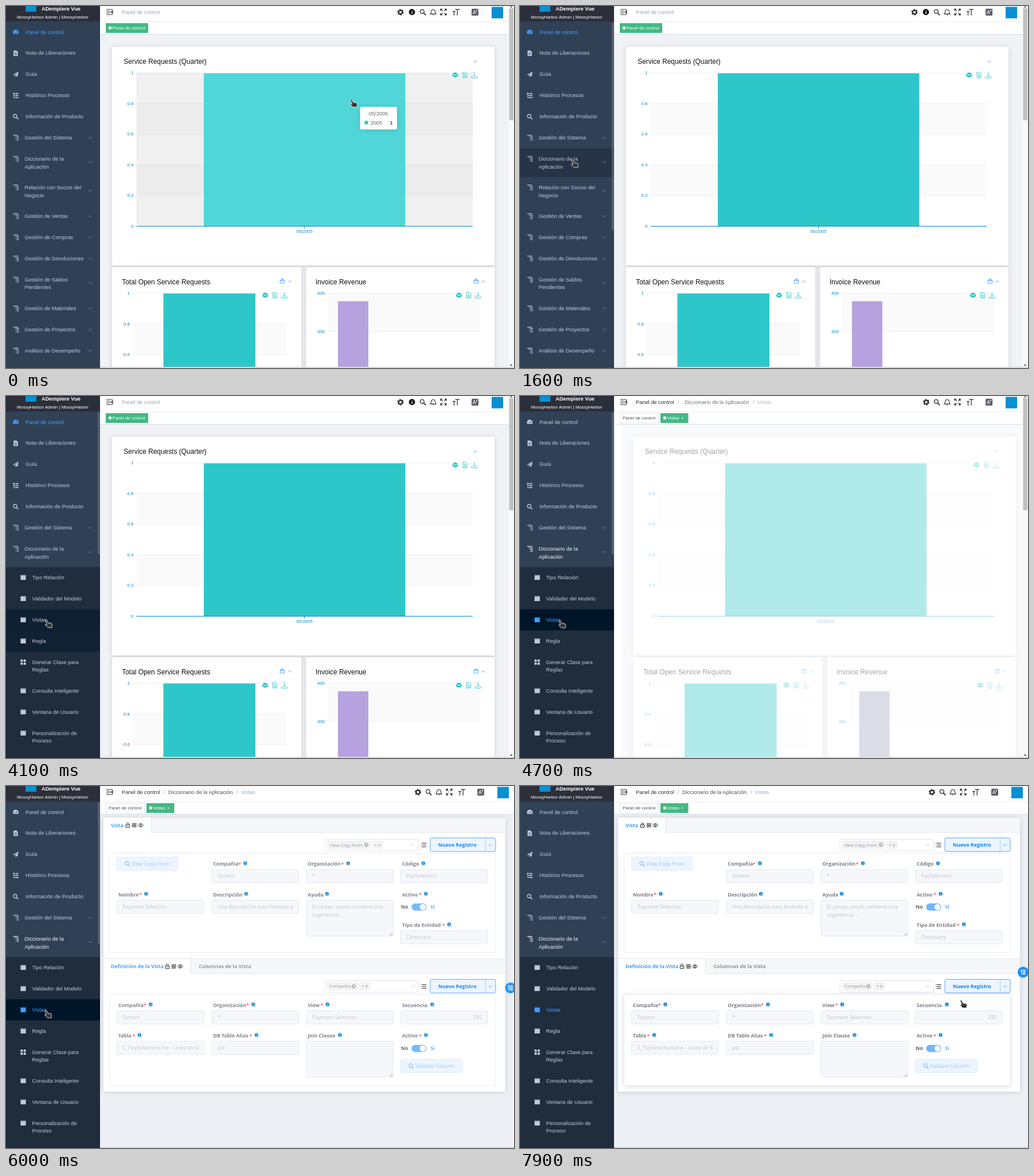
An HTML page for the animation above (8 s loop, 886 by 632 pixels).

```html
<!DOCTYPE html>
<html lang="es">
<head>
<meta charset="utf-8">
<title>Panel de control</title>
<style>
html, body { margin: 0; width: 100%; height: 100%; overflow: hidden; background: #fff; }
svg { display: block; }
#stage { width: 886px; height: 632px; font-family: "Liberation Sans", Arial, sans-serif; }
#form { font-family: "Open Sans", "Noto Sans", sans-serif; }
.card { filter: drop-shadow(0 1px 4px rgba(0,0,0,.14)); }
</style>
</head>
<body>
<svg id="stage" viewBox="0 0 886 632"></svg>
<script>
const LOOP = 8000, BLUE = '#409eff', TEAL = '#2ec7c9', MENU = '#bfcbd9', AXIS = '#008acd';

// ---- drawing helpers -------------------------------------------------
const rect = (x, y, w, h, fill, more = '') => `<rect x="${x}" y="${y}" width="${w}" height="${h}" fill="${fill}" ${more}/>`;
const text = (x, y, s, fill, size = 9.24, more = '') =>
  `<text x="${x}" y="${y}" fill="${fill}" font-size="${size}" ${more}>${s}</text>`;
const line = (d, color, w = 1, more = '') => `<path d="${d}" fill="none" stroke="${color}" stroke-width="${w}" ${more}/>`;
const group = (id, body, more = '') => `<g id="${id}" ${more}>${body}</g>`;
const bold = 'font-weight="700"', mid = 'text-anchor="middle"', end = 'text-anchor="end"';
const chevron = (x, y, color, up) => line(`M${x - 3} ${y + (up ? 1.6 : -1.6)}l3 ${up ? -3.2 : 3.2} 3 ${up ? 3.2 : -3.2}`, color, .9);

const ICONS = {
  gauge: '<path d="M-4.2 3.4a4.9 4.9 0 1 1 8.4 0z"/><path d="M0 2L1.6-1.8M-3 .5h1M2 .5h1" stroke="#304156"/>',
  doc: '<path d="M-3.8-4.6h5l2.6 2.6v6.8h-7.6z"/><path d="M-2-.2h4M-2 2.2h4" stroke="#304156"/>',
  plane: '<path d="M4.8-4.7L-4.8.6l2.6 1.2L3-2.7-1 2.4v2.4L.8 3l2.4 1z"/>',
  tree: '<path d="M-4.8-4.5h3v2.2h-3zM-.6-4.4h5.2v1.9H-.6zM-.6-.9h5.2V1H-.6zM-.6 2.6h5.2v1.9H-.6zM-3.8-2.3h1v2h2v1h-2v2.5h2v1h-3z"/>',
  search: '<circle cx="-1" cy="-1" r="3" fill="none" stroke="currentColor" stroke-width="1.3"/><path d="M1.3 1.3L4.5 4.5" stroke="currentColor" stroke-width="1.7"/>',
  nested: '<path d="M-4.8-4.2H3.6M-2-1.5H-.8M.3-1.5h4.5M-.4 1.2H.6M1.4 1.2h3.4M-.4 4H.6M1.4 4h3.4" stroke="currentColor" stroke-width="1.3"/>',
  win: '<path d="M-4.6-4.2h1.4v1.2h1V-4.2h1.6v1.2h1V-4.2h1.6v1.2h1V-4.2h1.6v8.6h-9.2z"/>',
  blocks: '<path d="M-4.7-4.4h4v4h-4zM-4.7.7h4v4h-4zM.7.7h4v4h-4z"/><circle cx="2.7" cy="-2.4" r="2.2"/>',
  gear: '<circle r="3.3" fill="none" stroke="currentColor" stroke-width="2.3"/><circle r="4.8" fill="none" stroke="currentColor" stroke-width="1.6" stroke-dasharray="2.5 2.53"/>',
  info: '<circle r="5.4"/><path d="M.6-1L-.4 3.2M.9-3.2v1" stroke="#fff" stroke-width="1.4"/>',
  bell: '<path d="M-5 3.4h10C3.4 2 3.6.5 3.4-1.200 3-4.900-3-4.900-3.400-1.200-3.600.5-3.400 2-5 3.400zM-1 5h2M0-5v1" fill="none" stroke="currentColor" stroke-width="1.1"/>',
  full: '<path d="M-5-2v-3h3M2-5h3v3M5 2v3H2M-2 5h-3V2M-4.600-4.600l3.200 3.200M4.600-4.600L1.400-1.400M-4.600 4.600l3.200-3.200M4.600 4.600L1.400 1.400" fill="none" stroke="currentColor" stroke-width="1.300"/>',
  size: '<path d="M-1.500-4.500h7.500M2.200-4.500V6M-6-1h5M-3.500-1V6" stroke="currentColor" stroke-width="1.400"/>',
  lang: '<rect x="-6" y="-6" width="12" height="12" rx="1.500"/><path d="M-3.800 3.400L-1.200-3.400 1.400 3.400M-2.800 1.200H.4M2-3.500h2.600M3.300-3.500L2-.5" fill="none" stroke="#fff" stroke-width=".9"/>',
  stack: '<path d="M0-4.800L5-2.400 0 0-5-2.400z"/><path d="M-5-1.500v3.400L0 4.500 5 1.900v-3.400L0 1z"/>',
  page: '<path d="M-3.500-4.800h5l2 2v7.600h-7zM-1.800-1h3.600M-1.800 1h3.600M-1.800 3h3.600" fill="none" stroke="currentColor" stroke-width=".9"/>',
  down: '<path d="M0-5.500V2.500M-2.600 0L0 2.600 2.600 0M-4.800 2v3h9.600V2" fill="none" stroke="currentColor" stroke-width=".9"/>',
  box: '<path d="M-3.800-1h7.600v4.300h-7.600zM-2.800-1v-1.700h5.600V-1M-1.500-4.200h3" fill="none" stroke="currentColor" stroke-width=".9"/>',
  rows: '<path d="M-3-3.200h7.400M-3 0h7.400M-3 3.200h7.400M-4.800-3.200h1M-4.800 0h1M-4.800 3.200h1" stroke="currentColor" stroke-width="1.200"/>',
  lock: '<path d="M-3.200-.8h6.400v4.600h-6.400zM-2-.8v-1.400a2 2 0 0 1 4 0v1.400M0 1v1.200" fill="none" stroke="currentColor"/>',
  bars: '<path d="M-4-2.600h8M-4 0h8M-4 2.600h8" stroke="currentColor" stroke-width="1.300"/>',
  eye: '<path d="M-4.600 0Q0-6 4.600 0 0 6-4.600 0z" fill="none" stroke="currentColor"/><circle r="1.500" fill="none" stroke="currentColor"/>',
  tip: '<circle r="3.300"/><path d="M.3-.3L-.2 2M.5-1.800v.6" stroke="#fff" stroke-width=".9"/>'
};
const icon = (name, x, y, color, k = 1) =>
  `<g transform="translate(${x} ${y}) scale(${k})" color="${color}" fill="${color}">${ICONS[name]}</g>`;

// ---- sidebar ---------------------------------------------------------
const ROW = 36.96, TALL = 50;
function menuRows(labels, top, draw) {
  return labels.map(s => {
    const parts = s.split('|'), h = parts.length > 1 ? TALL : ROW, y = top;
    top += h;
    return draw(parts, y, h);
  }).join('');
}
const lines = (parts, x, y) => parts.map((s, i) => text(x, y + 21.7 + i * 13.2, s, 'currentColor')).join('');
const leafIcons = ['gauge', 'doc', 'plane', 'tree', 'search'];
let leaf = 0, sub = 0;
const leaves = menuRows(['Panel de control', 'Nota de Liberaciones', 'Guía', 'Histórico Procesos', 'Información de Producto'], 26.8,
  (p, y) => group('leaf' + leaf, icon(leafIcons[leaf++], 17, y + 18.6, 'currentColor') + lines(p, 34, y), `color="${MENU}"`));
const folder = (p, y, h) => icon('nested', 17.5, y + 18.3, 'currentColor') + lines(p, 32.5, y) +
  group('', chevron(147, y + h / 2 - (h > 40 ? 1 : 0), '#7d8998'), 'class="arrow"');
const subRow = (p, y, h) => {
  const n = sub++;
  return rect(0, y, 164, h, '#001528', `id="hover${n}"`) +
    group('sub' + n, icon(n === 4 ? 'blocks' : 'win', 30, y + 18.2, 'currentColor') + lines(p, 45.5, y), `color="${MENU}"`);
};
const sidebar = rect(0, 0, 164, 632, '#304156') + leaves +
  rect(0, 211.6, 164, ROW, '#263445', 'id="hoverSys"') + rect(0, 248.6, 164, TALL, '#263445', 'id="hoverDic"') +
  group('', menuRows(['Gestión del Sistema'], 211.6, folder), `color="${MENU}"`) +
  group('dic', menuRows(['Diccionario de la|Aplicación'], 248.6, folder), `color="${MENU}"`) +
  group('rest', menuRows(['Relación con Socios del|Negocio', 'Gestión de Ventas', 'Gestión de Compras', 'Gestión de Devoluciones',
    'Gestión de Saldos|Pendientes', 'Gestión de Materiales', 'Gestión de Proyectos', 'Análisis de Desempeño'], 298.6, folder), `color="${MENU}"`) +
  group('', rect(0, 298.4, 164, 469, '#1f2d3d') + menuRows(['Tipo Relación', 'Validador del Modelo', 'Vistas', 'Regla',
    'Generar Clase para|Reglas', 'Consulta Inteligente', 'Ventana de Usuario', 'Personalización de|Proceso'], 298.4, subRow), 'clip-path="url(#open)"') +
  rect(160, 28, 3.4, 364, 'rgba(144,147,153,.4)', 'id="thumb" rx="1.7"') +
  rect(0, 0, 164, 27, '#2b2f3a') + rect(34, -9, 19, 19, '#078fd3') +
  text(62, 8, 'ADempiere Vue', '#fff', 9.24, bold) + text(19, 22, 'MossyHarbor Admin | MossyHarbor', '#fff', 7.92);

// ---- top bar ---------------------------------------------------------
const DARK = '#303133';
const topbar = rect(164, 0, 722, 49.5, '#fff') + line('M164 27.5h722', '#eceef1') + line('M164 49.5h722', '#d8dce5') +
  line('M175 6h11M175 9h6.500M175 12h6.500M175 15h11M186 8l-3 2.500 3 2.500z', DARK, 1.2) +
  group('homeBar', text(202, 14, 'Panel de control', '#97a8be') + rect(174, 30, 74, 17, '#42b983') +
    '<circle cx="181.500" cy="38.300" r="2.700" fill="#fff"/>' + text(185.5, 41.4, 'Panel de control', '#fff', 7.92)) +
  group('viewBar', text(202, 14, 'Panel de control', DARK) + text(274.5, 14, '/', '#a0a6b0') +
    group('crumbs', text(283, 14, 'Diccionario de la Aplicación', '#48505c') + text(402, 14, '/', '#a0a6b0') + text(409.5, 14, 'Vistas', '#97a8be')) +
    rect(174, 30.5, 67.5, 16.5, '#fff', 'stroke="#d8dce5" stroke-width=".8"') + text(179, 41.4, 'Panel de control', '#495060', 7.92) +
    rect(245, 30, 48.5, 17, '#42b983') + '<circle cx="252.500" cy="38.300" r="2.700" fill="#fff"/>' +
    text(256.5, 41.4, 'Vistas', '#fff', 7.92) + text(283, 41, '×', '#fff', 7, mid)) +
  group('tools', group('gear', icon('gear', 0, 10.8, DARK)) + group('info', icon('info', 708, 10.5, '#111')) +
    icon('search', 727, 10.8, '#444', 1.15) + icon('bell', 745, 10.5, DARK) + icon('full', 763, 10.5, DARK) +
    icon('size', 785, 10.5, '#444') + icon('lang', 818, 10.8, '#5a5e66') + rect(847, 1.5, 20, 20, '#078fd3'));

// ---- dashboard -------------------------------------------------------
const card = (x, y, w, h) => rect(x, y, w, h, '#fff', 'class="card" rx="1.5"');
const toolbox = (x, y) => icon('stack', x, y, TEAL) + icon('page', x + 17, y, TEAL) + icon('down', x + 33.3, y, TEAL);
const axis = (labels, x0, x1, y0, step, grey) => labels.map((s, i) => {
  const y = y0 + step * i;
  return (i % 2 === grey ? rect(x0, y, x1 - x0, step, '#fafafa') : '') + line(`M${x0} ${y}H${x1}`, '#eee') +
    text(x0 - 5, y + 2.4, s, AXIS, 7.92, end);
}).join('');
const dash = rect(164, 50, 712, 582, '#f0f2f5') + card(185, 71, 667, 382) + card(185, 456, 330, 250) + card(523.5, 456, 328.5, 250) +
  text(205.3, 101.3, 'Service Requests (Quarter)', '#111', 11.88) + chevron(818.5, 97, BLUE, true) +
  axis(['1', '0.8', '0.6', '0.4', '0.2', '0'], 227.5, 814, 117, 53.5, 1) + rect(227.5, 384.8, 586.5, 53, '#fff') +
  rect(227.5, 117, 586.5, 267.5, 'rgba(150,150,150,.14)', 'id="shade"') +
  rect(345, 117.5, 351.5, 267, TEAL, 'id="bar"') + line('M227.500 384.500H814M520.500 384v4', AXIS) +
  text(520.5, 396.4, '05/2005', AXIS, 7.92, mid) + toolbox(783.5, 120.5) +
  text(202.3, 486, 'Total Open Service Requests', '#111', 11.88) + icon('box', 482, 480.5, BLUE) + chevron(495, 481, BLUE, true) +
  axis(['1', '0.8', '0.6'], 221, 489, 501.5, 53.6, 1) + rect(274.5, 502, 160.5, 130, TEAL) + toolbox(452, 505) +
  text(540, 486, 'Invoice Revenue', '#111', 11.88) + icon('box', 820, 480.5, BLUE) + chevron(832.7, 481, BLUE, true) +
  axis(['400', '300'], 561, 827, 501.5, 67, 0) + rect(579, 515.5, 53, 120, '#b6a2de', 'id="revenue"') + toolbox(790, 505) +
  group('tooltip', rect(0, 0, 64.5, 39.5, '#fff', 'rx="2.500" class="card"') + text(32, 15, '05/2005', '#666', 9.24, mid) +
    `<circle cx="11" cy="27.500" r="3.300" fill="${TEAL}"/>` + text(18, 30.8, '2005', '#666') + text(52, 30.8, '1', '#555', 9.24, bold));

// ---- form ------------------------------------------------------------
const COLS = [194.5, 360, 525, 689.5];
const box = (x, y, w, h, fill, stroke, r = 2.6) => rect(x, y, w, h, fill, `stroke="${stroke}" stroke-width=".9" rx="${r}"`);
const label = (c, y, s, tipX, need = true) => text(COLS[c] + 2.3, y + 3.2, s, '#7b7f87', 8.8, bold) +
  (need ? text(tipX - 10, y + 4, '*', '#f56c6c', 9, bold + mid.replace('text', ' text')) : '') + icon('tip', tipX, y - 1, '#1c8fd8');
const input = (c, y, lines, h = 23, right) => box(COLS[c], y, 151.8, h, '#f5f7fa', '#e1e5ec') +
  `<svg x="${COLS[c] + 9}" y="${y}" width="${h > 30 ? 140 : 133}" height="${h}">` +
  lines.split('|').map((s, i) => text(right ? 133 : 1, 14.3 + i * 14, s, '#bfc3cb', 9.05, right ? end : '')).join('') + '</svg>' +
  (h > 30 ? line(`M${COLS[c] + 150} ${y + h - 6}l-5 5m5-2l-2 2`, '#888', .8) : '');
const field = (c, y, name, tipX, value, need, h, right) => label(c, y, name, tipX, need) + input(c, y + 10, value, h, right);
const toggle = y => text(690, y + 3.2, 'No', '#606266', 8.8, bold) + rect(708.5, y - 6, 26, 12.5, '#6fb6ff', 'rx="6.200"') +
  `<circle cx="728" cy="${y + .2}" r="5.200" fill="#fff"/>` + text(741.3, y + 3.2, 'Si', '#5fb0ff', 8.8, bold);
const paleButton = (x, y, w, s) => box(x, y, w, 23.3, '#ecf5ff', '#d9ecff') + icon('search', x + 18.5, y + 12, '#8cc5ff') +
  text(x + 25.5, y + 15, s, '#8cc5ff', 8.95);
const chip = (x, y, w, s) => box(x, y - 6, w, 12, '#f4f4f5', '#e6e7ea', 2) + text(x + 3.5, y + 2.8, s, '#8f939a', 7.7);
const actions = (y, s, w) => box(558, y - 10, 163, 20.5, '#fff', '#dcdfe6') + chip(562, y, w, s) +
  `<circle cx="${562 + w - 6.500}" cy="${y}" r="3.600" fill="#b4b8bf"/>` + text(562 + w - 6.5, y + 2.3, '×', '#fff', 6.5, mid) +
  chip(562 + w + 4, y, 18, '+ 6') + chevron(711, y, '#c0c4cc') + icon('rows', 730, y + .3, '#444') +
  box(741, y - 12, 114, 23.7, '#ecf5ff', BLUE) + line(`M837.500 ${y - 12}v23.700`, '#8cc5ff', .8) +
  text(755, y + 3.2, 'Nuevo Registro', '#1682e6', 8.8, bold) + chevron(846, y + .3, BLUE);
const tab = (y, w, s, iconX) => rect(171, y, 701, 26, '#f5f7fa') + line(`M171 ${y + 26}h701M171 ${y}h701`, '#dfe3ea', .9) +
  rect(171.4, y + .4, w, 26.4, '#fff') + line(`M${171.4 + w} ${y}v26`, '#dcdfe6', .9) +
  text(184, y + 16.7, s, BLUE, 8.8, bold) +
  ['lock', 'bars', 'eye'].map((n, i) => icon(n, iconX + i * 11.3, y + 13.5, '#222')).join('');
const form = rect(140, 50, 746, 582, '#eceff4') + rect(171, 55, 701, 478.5, '#fff', 'class="card"') +
  tab(55, 83.3, 'Vista', 213.5) + actions(102.7, 'View Copy From', 74) + box(181.5, 117.3, 673.5, 173.5, '#fff', '#e6eaf1', 3) +
  paleButton(194.5, 124, 106.5, 'View Copy From') +
  field(1, 136, 'Compañía', 418.5, 'System') + field(2, 136, 'Organización', 598, '*') + field(3, 136, 'Código', 729, 'PaySelection', false) +
  field(0, 189.3, 'Nombre', 245.5, 'Payment Selection') + field(1, 189.3, 'Descripción', 420, 'Una descripción esta limitada a', false) +
  field(2, 189.3, 'Ayuda', 561, 'El campo ayuda contiene una|sugerencia; ...', false, 62.7) +
  label(3, 189.3, 'Activo', 733.5) + toggle(211) + field(3, 242.6, 'Tipo de Entidad', 774, 'Dictionary') +
  tab(301.5, 152, 'Definición de la Vista', 282.5) + text(337.5, 318.3, 'Columnas de la Vista', '#909399', 8.8, bold) +
  actions(349.6, 'Compañía', 52) + group('panel', box(181.5, 364, 673.5, 159, '#fff', '#e6eaf1', 3)) +
  field(0, 382.4, 'Compañía', 253.5, 'System') + field(1, 382.4, 'Organización', 432.5, '*') +
  field(2, 382.4, 'View', 562, 'Payment Selection') + field(3, 382.4, 'Secuencia.', 744.5, '280', false, 23, true) +
  field(0, 435.7, 'Tabla', 234, 'C_PaySelectionLine - Línea de Selección') + field(1, 435.7, 'DB Table Alias', 438, 'psl') +
  field(2, 435.7, 'Join Clause', 583.5, '', false, 62.7) + label(3, 435.7, 'Activo', 733.5) + toggle(458) +
  paleButton(689.5, 477, 107.5, 'Validate Column') +
  group('float', '<circle r="9.500" fill="#1890ff"/>' + icon('tree', 0, 0, '#fff', .9));

const scrollbar = rect(876, 0, 10, 632, '#f9f9fa') + rect(877.5, 4, 7.5, 195.5, '#c1c1c1') +
  '<path d="M878.500 2.500h5l-2.500-2.500zM878.500 626h5l-2.500 2.800z" fill="#505050"/>';
const hand = '<path d="M-1.600 1.200C-1.600-.6.600-.8 1.200.800L2.800 5l5 .7q2.300.5 2.100 2.900l-.5 4.800H2.700L-1.400 9.300Q-2.600 7.400-.5 7.600L1 8.200z" fill="#333" stroke="#fff" stroke-width=".8"/>' +
  '<path d="M4.800 6v2M7 6.300v1.900" stroke="#999" stroke-width=".5"/>';

document.getElementById('stage').innerHTML =
  '<defs><clipPath id="open"><rect id="openBox" x="0" y="298.400" width="164" height="0"/></clipPath>' +
  '<clipPath id="main"><rect x="164" y="50" width="722" height="582"/></clipPath></defs>' + rect(0, 0, 886, 632, '#fff') +
  group('', group('dash', dash) + group('form', form), 'clip-path="url(#main)"') +
  topbar + group('scroll', scrollbar) + rect(164, 630, 722, 2, '#d9dbdf') + sidebar + group('cursor', hand);

// ---- motion ----------------------------------------------------------
const $ = id => document.getElementById(id);
const set = (id, o) => { for (const k in o) $(id).setAttribute(k, o[k]); };
const move = (id, x, y) => set(id, { transform: `translate(${x} ${y})` });
const show = (id, on) => set(id, { visibility: on ? 'visible' : 'hidden' });
const ramp = (t, from, ms) => Math.min(1, Math.max(0, (t - from) / ms));
const pulse = (t, from, to, ms = 300) => ramp(t, from, ms) - ramp(t, to, ms);

// CSS "ease": cubic-bezier(.25, .1, .25, 1)
function ease(p) {
  let lo = 0, hi = 1, u = p;
  for (let i = 0; i < 24; i++) {
    u = (lo + hi) / 2;
    const x = .75 * u * (1 - u) * (1 - u) + .75 * u * u * (1 - u) + u * u * u;
    if (x < p) lo = u; else hi = u;
  }
  return p >= 1 ? 1 : .3 * u * (1 - u) * (1 - u) + 3 * u * u * (1 - u) + u * u * u;
}

const PATH = [[0, 602.5, 163], [100, 602.5, 163], [200, 612, 318], [300, 612, 318], [400, 500, 318], [500, 500, 318],
  [600, 420, 312], [1400, 106, 252], [1600, 91.5, 268.5], [2300, 97, 287], [2500, 98, 289], [3000, 98, 289], [3600, 71, 420],
  [3800, 71, 418], [4100, 70.5, 391], [4300, 69.7, 391.5], [7000, 69.7, 391.5], [7100, 299, 312], [7300, 299, 312],
  [7400, 600, 432], [7600, 600, 432], [7700, 685, 405], [7800, 685, 405], [7900, 769.5, 374], [LOOP, 769.5, 374]];
function cursorAt(t) {
  const q = Math.floor(t / 100) * 100;
  const i = PATH.findIndex(p => p[0] > q), a = PATH[i - 1], b = PATH[i], k = (q - a[0]) / (b[0] - a[0]);
  return [a[1] + (b[1] - a[1]) * k, a[2] + (b[2] - a[2]) * k];
}

function update(t) {
  const [x, y] = cursorAt(t), [tx, ty] = cursorAt(Math.min(t, 1000));
  move('cursor', x, y);
  move('tooltip', tx + 15, ty + 13);
  set('tooltip', { opacity: 1 - ramp(t, 1050, 200) });
  show('shade', t < 1100);
  set('bar', { fill: t < 800 ? '#50d6d9' : TEAL });

  const opened = ease(ramp(t, 2950, 300)), h = 469 * opened, viewing = t >= 4450;
  set('openBox', { height: h });
  move('rest', 0, h);
  set('thumb', { height: 364 - 116 * opened, opacity: pulse(t, 1200, 7150, 200) });
  document.querySelector('#dic .arrow').setAttribute('transform', `rotate(${180 * opened} 147 272.600)`);
  set('hoverSys', { opacity: pulse(t, 1150, 1300, 200) });
  set('hoverDic', { opacity: pulse(t, 1300, 3050, 250) });
  const hovers = [pulse(t, 3100, 3250), pulse(t, 3250, 3380), pulse(t, 3380, 3500, 150) + pulse(t, 3950, 7050), pulse(t, 3500, 3950)];
  for (let i = 0; i < 8; i++) set('hover' + i, { opacity: hovers[i] || 0 });
  set('leaf0', { color: viewing ? MENU : BLUE });
  set('dic', { color: viewing ? '#f4f4f5' : MENU });
  set('sub2', { color: viewing ? BLUE : MENU });

  const crumb = ease(ramp(t, 4450, 500)), wide = t >= 5600;
  show('homeBar', !viewing);
  show('viewBar', viewing);
  move('crumbs', 20 * (1 - crumb), 0);
  set('crumbs', { opacity: crumb });
  show('info', !viewing);
  move('gear', viewing ? 708.5 : 688, 0);
  move('tools', wide ? 10 : 0, 0);
  show('scroll', !wide);

  const out = ease(ramp(t, 4518, 500)), into = ease(ramp(t, 5650, 500));
  move('dash', 20 * out, 0);
  set('dash', { opacity: 1 - out });
  set('revenue', { fill: viewing ? '#9ea5bd' : '#b6a2de' });
  move('form', -20 * (1 - into), 0);
  set('form', { opacity: into });
  move('float', into < 1 ? 881 : 877.5, into < 1 ? 352.5 : 325);
  set('panel', { class: into < 1 ? '' : 'card' });
}

const start = performance.now();
function tick() {
  update((performance.now() - start) % LOOP);
  requestAnimationFrame(tick);
}
tick();
</script>
</body>
</html>
```
